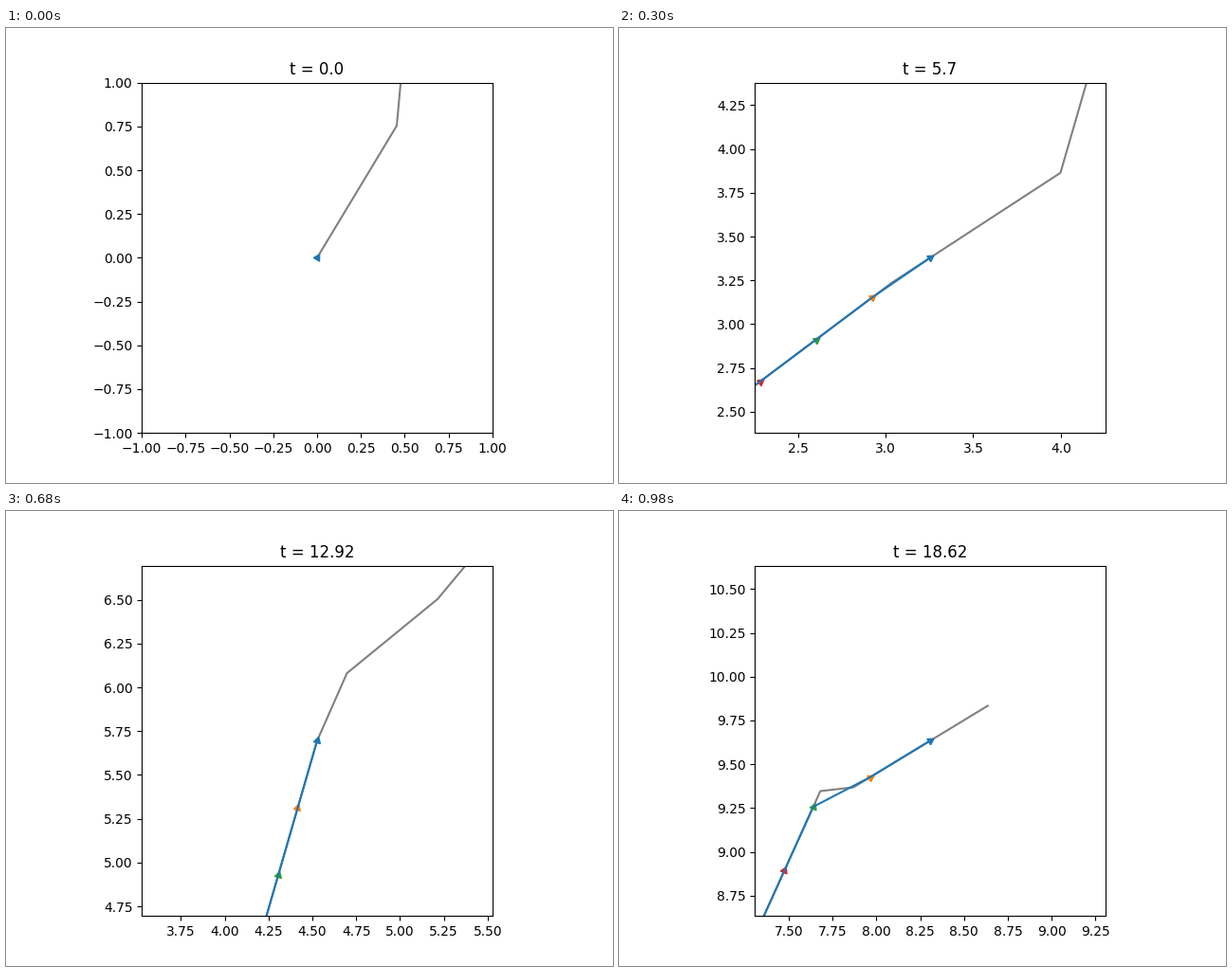
Recreate the animation shown at these times as a matplotlib script. Size 640x480 px, loop 1 s.

```python
import numpy as np
import matplotlib.pyplot as plt
from matplotlib.animation import FuncAnimation

FRAMES = 50
TIME_STEP = 0.38
CAR_GAP = 0.4
CARS = 6

TRACK = np.array([
    (0, 0), (0.4545, 0.754), (0.483, 1.066), (0.805, 1.504),
    (1.5245, 2.1456), (2.141, 2.565), (3.0375, 3.2377), (3.998, 3.864),
    (4.527, 5.695), (4.6975, 6.081), (5.214, 6.5034), (5.5603, 6.919),
    (5.9824, 7.0354), (6.4694, 7.785), (7.281, 8.464), (7.680, 9.3467),
    (7.869, 9.3683), (8.635, 9.8337),
])
STATION = 8

STEPS = np.diff(TRACK, axis=0)
HEADINGS = np.degrees(np.arctan2(STEPS[:, 1], STEPS[:, 0]))
MILEAGE = np.concatenate([[0], np.cumsum(np.hypot(*STEPS.T))])


def travelled(t):
    """Distance of the front car: steady run, stop at the station, steady run."""
    stop, end = MILEAGE[STATION], MILEAGE[-1]
    return np.interp(t, [0, 9, 13, 19], [0, stop, stop, end])


def point_at(s):
    return np.interp(s, MILEAGE, TRACK[:, 0]), np.interp(s, MILEAGE, TRACK[:, 1])


def heading_at(s):
    return HEADINGS[max(np.searchsorted(MILEAGE, s) - 1, 0)]


fig, ax = plt.subplots(figsize=(6.4, 4.8), dpi=100)
ax.set_aspect("equal")
ax.plot(*TRACK.T, color="gray")
cars = [ax.plot([], [], color=f"C{i}", linestyle="none")[0] for i in range(CARS)]
train, = ax.plot([], [], color="C0")


def update(frame):
    t = frame * TIME_STEP
    front = travelled(t)
    points = []
    for i, car in enumerate(cars):
        s = front - i * CAR_GAP
        car.set_visible(s >= 0)
        if s >= 0:
            x, y = point_at(s)
            points.append((x, y))
            car.set_data([x], [y])
            car.set_marker((3, 0, heading_at(s) - 90))
    train.set_data(*zip(*points))
    x, y = points[0]
    ax.set_xlim(x - 1, x + 1)
    ax.set_ylim(y - 1, y + 1)
    ax.set_title(f"t = {round(t, 2)}")
    return [*cars, train]


anim = FuncAnimation(fig, update, frames=FRAMES, interval=20, repeat=True,
                     repeat_delay=0, blit=False)
plt.show()
```
